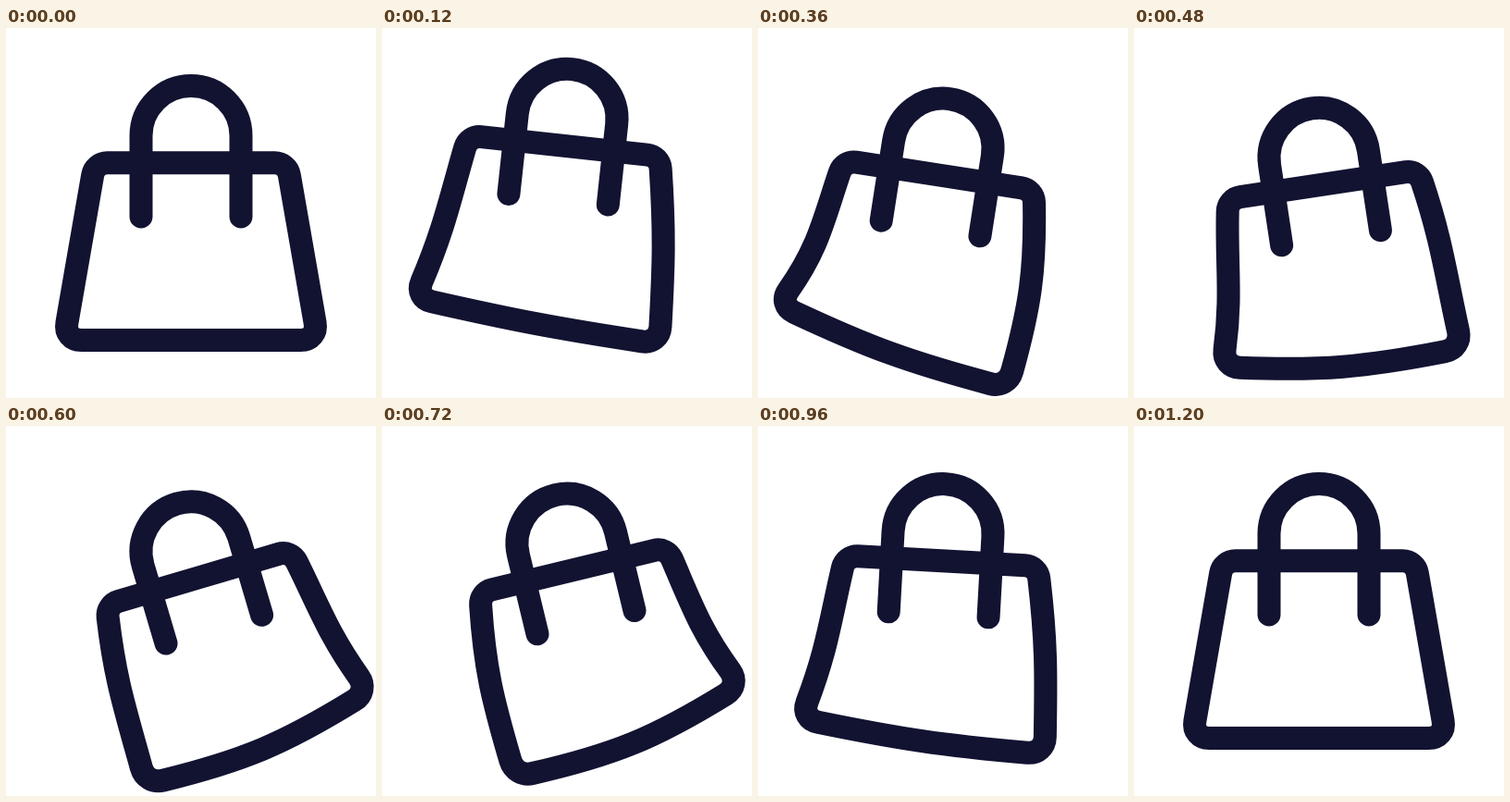
Recreate the animation shown at these times as an HTML page with a canvas. Size 400 by 400 pixels, loop 3230 ms.

```html
<!DOCTYPE html>
<html lang="en">
<head>
<meta charset="utf-8">
<title>Swinging bag</title>
<style>
html, body { margin: 0; width: 100%; height: 100%; overflow: hidden; background: #fff; }
canvas { display: block; width: 100%; height: 100%; }
</style>
</head>
<body>
<canvas id="stage"></canvas>
<script>
const canvas = document.getElementById('stage');
const ctx = canvas.getContext('2d');
const LOOP = 3230, STEP = 30, LAST = 40;
const RAD = Math.PI / 180;
const CX = 200, CY = 116.6, RADIUS = 54, LEG_END = 204;
const TOP = 145.8, HALF_TOP = 104, SLANT = 9.9;

const mix = (a, b, s) => a + (b - a) * s;
const blend = (p, q, s) => p.map((v, i) => mix(v, q[i], s));

// Pose: bottom left x, y, bottom right x, y, bend of the sides, sag of the bottom (degrees)
const REST = [62.6, 337.5, 337.4, 337.5, 0, 0];
const LEFT = [49.4, 310.5, 308, 363, 17, 5];
const RIGHT = [87, 349.5, 347, 308.5, -13, 9.5];
const BACK = blend(REST, LEFT, 0.55);

// Keys: [step, value, ease of the segment that ends here]
const LIFT = [[0, 0], [6, -24], [14.8, 24], [32, 0]];
const TURN = [[0, 0], [8.8, 14.5], [19.8, -16.5], [33, 3.3, 0.6], [40, 0]];
const POSE = [[0, REST], [9, LEFT], [11, LEFT], [23, RIGHT], [34, BACK], [40, REST]];

// Symmetric cubic-bezier(e, 0, 1 - e, 1)
function ease(u, e = 0.4) {
  let lo = 0, hi = 1;
  for (let i = 0; i < 24; i++) {
    const m = (lo + hi) / 2, k = 1 - m;
    const x = 3 * m * k * k * e + 3 * m * m * k * (1 - e) + m * m * m;
    if (x < u) lo = m; else hi = m;
  }
  return lo * lo * (3 - 2 * lo);
}

function at(keys, n, join) {
  const i = keys.findIndex(k => k[0] > n);
  if (i < 0) return keys[keys.length - 1][1];
  const [a, from] = keys[i - 1], [b, to, e] = keys[i];
  return join(from, to, ease((n - a) / (b - a), e));
}

const move = ([x, y], deg, d) => [x + d * Math.cos(deg * RAD), y + d * Math.sin(deg * RAD)];

// Smooth edge that leaves p along angle a and reaches q along angle b
function edge(p, a, q, b) {
  const d = 0.4 * Math.hypot(q[0] - p[0], q[1] - p[1]);
  ctx.bezierCurveTo(...move(p, a, d), ...move(q, b, -d), ...q);
}

// Closed outline through rounded corners; each has a vertex, its size, and angles in and out
function outline(corners) {
  const ends = corners.map(c => ({
    ...c, p: move(c.v, c.into, -c.size), q: move(c.v, c.out, c.size)
  }));
  let prev = ends[ends.length - 1];
  ctx.beginPath();
  ctx.moveTo(...prev.q);
  for (const c of ends) {
    edge(prev.q, prev.out, c.p, c.into);
    ctx.bezierCurveTo(...blend(c.p, c.v, 0.58), ...blend(c.q, c.v, 0.58), ...c.q);
    prev = c;
  }
  ctx.closePath();
  ctx.stroke();
}

function drawBody([lx, ly, rx, ry, bend, sag]) {
  const base = Math.atan2(ly - ry, lx - rx) / RAD;
  const down = 90 - SLANT, up = SLANT - 90;
  outline([
    { v: [CX + HALF_TOP, TOP], size: 13.5, into: 0, out: down },
    { v: [rx, ry], size: 19, into: down + bend, out: base - sag },
    { v: [lx, ly], size: 19, into: base + sag, out: -down + bend },
    { v: [CX - HALF_TOP, TOP], size: 13.5, into: up, out: 0 }
  ]);
}

function drawHandle() {
  ctx.beginPath();
  ctx.moveTo(CX - RADIUS, LEG_END);
  ctx.arc(CX, CY, RADIUS, Math.PI, 0);
  ctx.lineTo(CX + RADIUS, LEG_END);
  ctx.stroke();
}

function draw(n) {
  const dpr = window.devicePixelRatio || 1;
  const w = Math.round(innerWidth * dpr), h = Math.round(innerHeight * dpr);
  if (canvas.width !== w || canvas.height !== h) {
    canvas.width = w;
    canvas.height = h;
  }
  ctx.setTransform(w / 400, 0, 0, h / 400, 0, 0);
  ctx.fillStyle = '#fff';
  ctx.fillRect(0, 0, 400, 400);
  ctx.strokeStyle = '#121331';
  ctx.lineWidth = 25;
  ctx.lineCap = ctx.lineJoin = 'round';
  ctx.translate(CX, CY + at(LIFT, n, mix));
  ctx.rotate(at(TURN, n, mix) * RAD);
  ctx.translate(-CX, -CY);
  drawBody(at(POSE, n, blend));
  drawHandle();
}

const start = performance.now();
function tick() {
  const t = (performance.now() - start) % LOOP;
  draw(Math.min(LAST, Math.floor(t / STEP)));
  requestAnimationFrame(tick);
}
tick();
</script>
</body>
</html>
```
